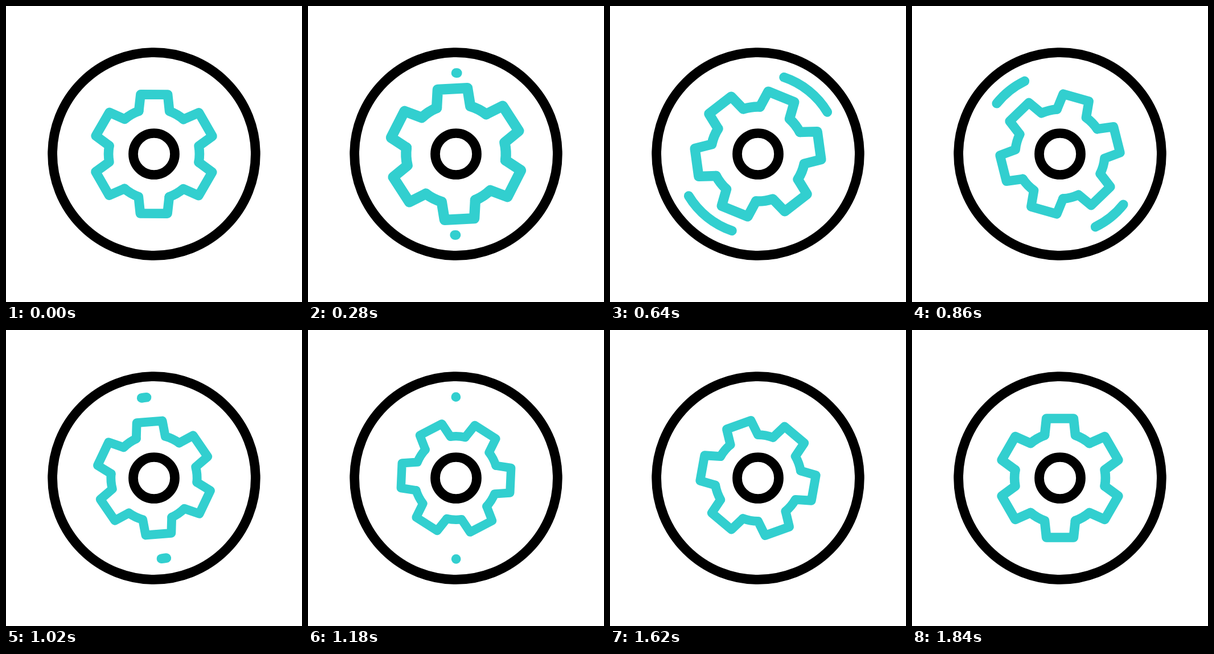
Recreate the animation shown at these times as an HTML page. Size 520 px wide and 520 px high, loop 2420 ms.

```html
<!DOCTYPE html>
<html lang="en">
<head>
<meta charset="utf-8">
<title>Turning gear</title>
<style>
  @property --tail { syntax: "<length>"; inherits: true; initial-value: 0px; }
  @property --head { syntax: "<length>"; inherits: true; initial-value: 0px; }

  html, body { margin: 0; width: 100%; height: 100%; overflow: hidden; background: #fff; }
  svg {
    display: block; width: 100%; height: 100%;
    fill: none; stroke-width: 16.7; stroke-linecap: round; stroke-linejoin: round;
    --loop: 2420ms;
  }
  .ink { stroke: #000; }
  .teal { stroke: #32cfcf; }

  .gear {
    transform-origin: 0 0;
    animation: turn var(--loop) infinite, pulse var(--loop) infinite;
  }
  /* one full turn, easing in fast and settling slowly */
  @keyframes turn {
    0%       { rotate: 0deg;      animation-timing-function: cubic-bezier(.333, .263, .667, .625); }
    11.5702% { rotate: 56.75deg;  animation-timing-function: cubic-bezier(.333, .321, .667, .66); }
    26.4463% { rotate: 141.9deg;  animation-timing-function: cubic-bezier(.333, .329, .667, .666); }
    35.5372% { rotate: 195.65deg; animation-timing-function: cubic-bezier(.333, .341, .667, .701); }
    48.7603% { rotate: 272.3deg;  animation-timing-function: cubic-bezier(.333, .421, .667, .726); }
    59.5041% { rotate: 316.6deg;  animation-timing-function: cubic-bezier(.333, .43, .667, .816); }
    76.0331%, 100% { rotate: 360deg; }
  }
  @keyframes pulse {
    0%       { scale: 1;   animation-timing-function: cubic-bezier(.333, 0, .667, 1); }
    8.2645%  { scale: 1.1; animation-timing-function: cubic-bezier(.333, 0, .667, 1); }
    57.8512% { scale: .9;  animation-timing-function: cubic-bezier(.333, 0, .667, 1); }
    76.0331%, 100% { scale: 1; }
  }

  /* each sweep is a half circle, trimmed between tail and head */
  .sweeps {
    --ease: cubic-bezier(.685, 0, .315, 1);
    animation: head var(--loop) var(--ease) infinite,
               tail var(--loop) var(--ease) infinite,
               show var(--loop) step-end infinite;
  }
  .sweeps path {
    stroke-dasharray: calc(var(--head) - var(--tail)) 360px;
    stroke-dashoffset: calc(-1 * var(--tail));
  }
  @keyframes head {
    0%, 8.2645%    { --head: 0px; }
    49.5868%, 100% { --head: 180px; }
  }
  @keyframes tail {
    0%, 16.5289%   { --tail: 0px; }
    49.5868%, 100% { --tail: 180px; }
  }
  @keyframes show {
    0%             { opacity: 0; }
    8.2645%        { opacity: 1; }
    49.5868%, 100% { opacity: 0; }
  }
</style>
</head>
<body>
<svg viewBox="-260 -260 520 520">
  <defs>
    <path id="tooth" d="M-27-75.2L-23.8-104.5H23.8L27-75.2A80 80 0 0 1 51.63-60.98"/>
  </defs>
  <circle class="ink" r="178.4"/>
  <g class="teal sweeps">
    <path pathLength="180" d="M0-142.3A142.3 142.3 0 0 1 0 142.3"/>
    <path pathLength="180" d="M0 142.3A142.3 142.3 0 0 1 0-142.3"/>
  </g>
  <g class="teal gear">
    <use href="#tooth"/>
    <use href="#tooth" transform="rotate(60)"/>
    <use href="#tooth" transform="rotate(120)"/>
    <use href="#tooth" transform="rotate(180)"/>
    <use href="#tooth" transform="rotate(240)"/>
    <use href="#tooth" transform="rotate(300)"/>
  </g>
  <circle class="ink" r="36.5"/>
</svg>
</body>
</html>
```
